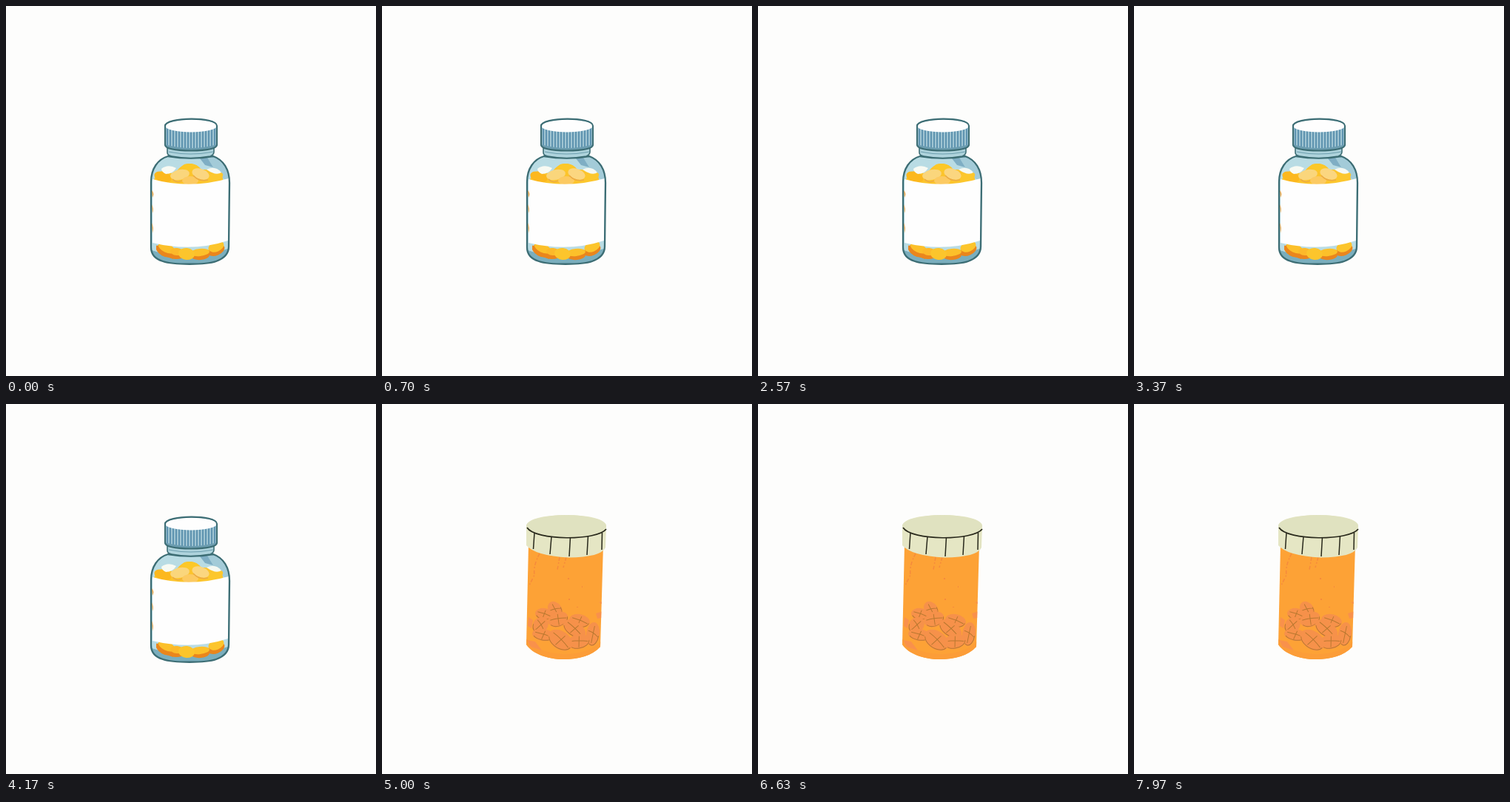
An HTML page with a canvas for the animation above (8 s loop, 500 px wide and 500 px high).

```html
<!DOCTYPE html>
<html lang="en">
<head>
<meta charset="utf-8">
<title>Pill bottles</title>
<style>
html, body { margin: 0; width: 100%; height: 100%; overflow: hidden; background: #fdfdfc; }
canvas { display: block; }
</style>
</head>
<body>
<canvas id="stage" width="500" height="500"></canvas>
<script>
const ctx = document.getElementById('stage').getContext('2d');
const LOOP = 8000, CUT = 5000;
const PAPER = '#fdfdfc', INK = '#3c6d74';

function shape(d, fill, stroke, width = 1) {
  const p = new Path2D(d);
  if (fill) { ctx.fillStyle = fill; ctx.fill(p); }
  if (stroke) { ctx.strokeStyle = stroke; ctx.lineWidth = width; ctx.stroke(p); }
}

function oval(x, y, rx, ry, turn, fill) {
  ctx.beginPath();
  ctx.ellipse(x, y, rx, ry, turn, 0, Math.PI * 2);
  ctx.fillStyle = fill;
  ctx.fill();
}

function clipped(d, draw) {
  ctx.save();
  ctx.clip(new Path2D(d));
  draw();
  ctx.restore();
}

function glassBottle() {
  const body = 'M219 203C205 207 196 220 196 238L196 326C196 336 202 342 212 345C226 350 270 350 284 345C295 341 301 334 301 325L302 239C302 221 294 208 280 203Q250 208 219 203Z';
  const cap = 'M215 162C215 150 285 149 285 162L285 188Q284 195 250 195.5Q216 195 215 188Z';

  shape(body, '#b9dce4');
  clipped(body, () => {
    shape('M194 329Q246 348 303 327L303 352L194 352Z', '#7aaebd');
    shape('M262 205L281 204Q299 214 301 236L290 232Q278 212 262 205Z', '#a3cbd8');
    shape('M262 206L272 205L280 218L269 215Z', '#7faec4');

    // upper pills
    shape('M199 240Q201 224 213 223L228 227Q237 212 250 213Q259 214 264 221Q286 220 292 230L296 244H199Z', '#fcc42c');
    oval(249, 218, 11, 5, 0.08, '#fcc828');
    oval(212, 231, 12, 7, 0.3, '#fcb81e');
    oval(281, 232, 13, 6, -0.4, '#fcc72d');
    oval(235, 228, 13, 7, -0.2, '#fad67c');
    oval(263, 227, 12, 7, 0.35, '#fbd680');
    oval(249, 236, 11, 6, 0, '#fcca62');
    shape('M225 234Q231 240 238 236M253 229Q261 238 273 235', null, '#eba944', 1.4);
    shape('M210 220Q219 213 230 219Q225 227 216 227Q210 224 210 220Z', '#f8faf3');
    shape('M271 221Q283 215 291 225Q284 230 271 221Z', '#f5f8f2');

    // lower pills
    oval(214, 331, 12, 7, 0.5, '#ea861d');
    oval(229, 337, 11, 5, 0.1, '#ea861d');
    oval(263, 338, 12, 5, -0.1, '#ea861d');
    oval(284, 330, 12, 7, -0.4, '#ea861d');
    oval(217, 327, 12, 6, 0.45, '#fcc02a');
    oval(231, 332, 9, 5, 0.1, '#fcb92a');
    oval(262, 333, 13, 5, -0.1, '#fcc02a');
    oval(244, 335, 11, 8, 0.1, '#fcc52c');
    oval(284, 325, 11, 7, -0.4, '#fcc52c');
    shape('M203 323Q209 333 225 337L226 342Q208 337 203 329Z', '#ea861d');

    shape('M198 234Q248 248 301 233L300 317Q252 333 198 320Z', '#fefefe');
    shape('M197 249Q201 253 198 259ZM197 268Q200 274 198 280ZM197 293Q200 299 198 307Z', '#eaa447');
  });
  shape(body, null, INK, 2.3);

  shape('M218 190L218 198Q218 202 224 203Q249 208 276 203Q281 201 281 197L281 190Z', '#aed3dc', INK, 1.6);
  shape('M220 197Q249 203 280 197', null, '#6c9eae', 1.2);

  shape(cap, '#9fc4d2');
  clipped(cap, () => {
    ctx.fillStyle = '#5f94b0';
    for (let x = 217; x < 285; x += 4) ctx.fillRect(x, 164, 2, 31);
    shape('M214 187Q250 197 286 187L286 197H214Z', '#6b9caf');
    oval(250, 162, 35, 8.5, 0, '#fefefe');
  });
  shape(cap, null, INK, 2.1);
}

// x, y, rx, ry, turn
const tablets = [
  [234, 278, 9, 12, -0.6], [219, 284, 12, 8, 0.15], [267, 293, 14, 9, 0.2],
  [238, 291, 14, 10, -0.35], [214, 299, 10, 12, 0.7], [260, 304, 17, 10, 0.6],
  [218, 312, 15, 8, 0.15], [285, 311, 9, 16, 0.12], [266, 321, 15, 10, -0.2],
  [241, 319, 18, 12, 0.6]
];

function tablet([x, y, rx, ry, turn]) {
  ctx.save();
  ctx.translate(x, y);
  ctx.rotate(turn);
  oval(0, 0, rx, ry, 0, '#f6914a');
  ctx.strokeStyle = '#b9782f';
  ctx.lineWidth = 1;
  ctx.beginPath();
  ctx.ellipse(0, 0, rx - 1, ry - 1, 0, 0.1, 2.7);
  ctx.moveTo(-rx * 0.75, -ry * 0.25);
  ctx.quadraticCurveTo(0, -ry * 0.2, rx * 0.8, ry * 0.2);
  ctx.moveTo(rx * 0.12, -ry * 0.7);
  ctx.lineTo(-rx * 0.1, ry * 0.75);
  ctx.stroke();
  ctx.restore();
}

function orangeBottle() {
  const body = 'M198 190L299 190L295 328C284 340 266 345 246 345C222 345 203 337 195 325Z';
  shape(body, '#fda236');
  clipped(body, () => {
    shape('M194 316Q207 336 246 338Q278 338 296 321L296 347H194Z', '#fc9d38');
    ctx.setLineDash([5, 2, 2, 3]);
    shape('M213 202Q204 219 206 231L199 245M240 207L237 224M249 207L245 221', null, '#f58a3c', 1.5);
    ctx.setLineDash([]);
    shape('M251 235h2v2h-2ZM252 263h2v2h-2ZM270 246h1v2h-1ZM263 274h2v1h-2Z', '#f58a3c');
    shape('M289 283L298 280L297 289L291 290ZM293 268L298 267V271ZM198 288L204 292L202 303L197 300ZM196 319L207 321L216 333L201 328Z', '#f9914b');
    tablets.forEach(tablet);
  });

  shape('M195 165C195 145 303 145 303 165L302 194Q296 207 252 207.5Q207 205 195 191Z', '#e5e6c4');
  oval(249, 165, 54, 15, 0, '#e0e2c0');
  shape('M196 167C207 185 291 185 303 169', null, '#28281b', 1.7);
  shape('M206 174L204.5 196M229 179L227 203M254.5 180L253 206M278.5 178L277 204M297.5 174L297 197', null, '#28281b', 1.5);
}

function frame(now) {
  ctx.fillStyle = PAPER;
  ctx.fillRect(0, 0, 500, 500);
  if (now % LOOP < CUT) glassBottle();
  else orangeBottle();
}

const start = performance.now();
function tick() {
  frame(performance.now() - start);
  requestAnimationFrame(tick);
}
tick();
</script>
</body>
</html>
```
